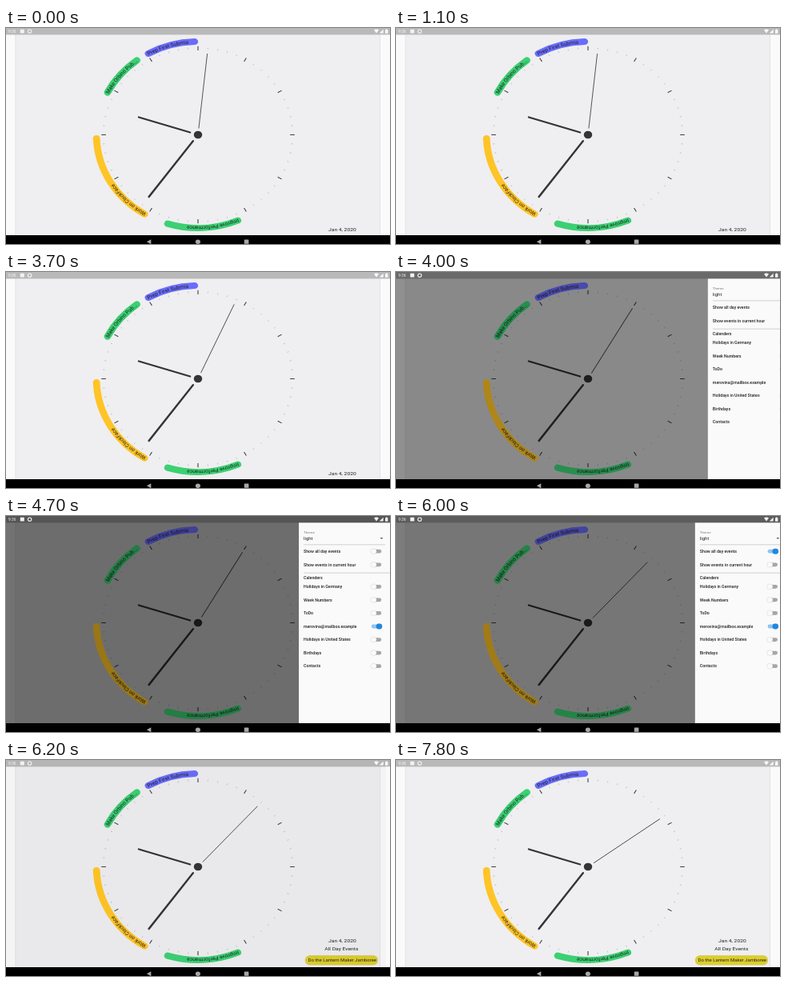
Animation, 480 px wide and 270 px high, one loop 8000 ms. Source, as an HTML page:

```html
<!DOCTYPE html>
<html lang="en">
<head>
<meta charset="utf-8">
<title>Calendar clock</title>
<style>
  html, body { margin: 0; width: 100%; height: 100%; overflow: hidden; background: #000; }
  svg { display: block; width: 480px; height: 270px; }
  text { font-family: Roboto, "Noto Sans", sans-serif; white-space: pre; }
</style>
</head>
<body>
<svg id="stage" viewBox="0 0 480 270"></svg>
<script>
const LOOP = 8000, STEP = 100;
// One screen dp in stage pixels; the screen is slightly wider than true.
const DX = 0.375, DY = 0.345;
const DRAWER_W = 114, SPRING = 0.0224;
const INK = '#333537';

const stage = document.getElementById('stage');

function add(parent, tag, attrs = {}, content) {
  const el = document.createElementNS('http://www.w3.org/2000/svg', tag);
  for (const key in attrs) el.setAttribute(key, attrs[key]);
  if (content !== undefined) el.textContent = content;
  parent.appendChild(el);
  return el;
}
const rect = (parent, x, y, width, height, fill, rx = 0) =>
  add(parent, 'rect', { x, y, width, height, fill, rx });
const path = (parent, d, attrs) => add(parent, 'path', { d, ...attrs });
const label = (parent, x, y, size, str, attrs = {}) =>
  add(parent, 'text', {
    transform: `translate(${x} ${y}) scale(${DX} ${DY})`,
    'font-size': size, fill: '#212121', ...attrs
  }, str);

// Clock angles run clockwise from twelve.
function polar(r, deg) {
  const a = deg * Math.PI / 180;
  return `${(r * Math.sin(a)).toFixed(2)} ${(-r * Math.cos(a)).toFixed(2)}`;
}
const arc = (r, from, to) => `M${polar(r, from)}A${r} ${r} 0 0 1 ${polar(r, to)}`;
const spoke = (r1, r2, deg) => `M${polar(r1, deg)}L${polar(r2, deg)}`;
const dial = parent => add(parent, 'g', { transform: 'translate(240 133.5) scale(1.09 1)' });

// Page
rect(stage, 0, 0, 480, 259, '#fafafa');
rect(stage, 11.5, 8, 456.5, 251, '#dedede');
rect(stage, 12.3, 8, 455, 251, '#efeef0');
rect(stage, 0, 0, 480, 8.4, '#b9b9b9');

// Dial and hands
const face = dial(stage);
let hours = '', minutes = '';
for (let i = 0; i < 60; i++) {
  if (i % 5) minutes += spoke(107.6, 109.4, i * 6);
  else hours += spoke(105.6, 110.8, i * 6);
}
path(face, minutes, { stroke: '#b4b4b4', 'stroke-width': 0.8 });
path(face, hours, { stroke: '#404040', 'stroke-width': 1 });
path(face, spoke(9.5, 71.5, 288), { stroke: INK, 'stroke-width': 2.1, 'stroke-linecap': 'round' });
path(face, spoke(9.5, 95.8, 216), { stroke: INK, 'stroke-width': 2.3, 'stroke-linecap': 'round' });
const second = path(face, spoke(8, 102, 0), { stroke: '#4a4a4a', 'stroke-width': 0.85 });
add(face, 'circle', { r: 4.8, fill: INK });

// Date and all-day events
const middle = { 'text-anchor': 'middle' };
const dateOnly = add(stage, 'g');
label(dateOnly, 420.4, 254.4, 18, 'Jan 4, 2020', middle);
const allDay = add(stage, 'g');
label(allDay, 420.4, 228.2, 18, 'Jan 4, 2020', middle);
label(allDay, 419.4, 237.6, 18, 'All Day Events', middle);
rect(allDay, 373.8, 244.2, 91.2, 12.2, '#cfc78a', 6);
rect(allDay, 374.2, 244.6, 90.4, 11.4, '#ddce2c', 5.7);
label(allDay, 377.5, 252.4, 16, 'Do the Lantern Maker Jamboree');

const scrim = rect(stage, 0, 0, 480, 259, '#000');

// Events around the dial
const events = [
  [-29.3, -1.9, '#6a6cfb', 'Prep First Submis'],
  [-63, -37, '#3bd073', 'Make Orbino Pub...'],
  [-148.3, -92.2, '#ffc425', 'Work on ClockFace'],
  [156.9, 197.4, '#3bd073', 'Improve Performance']
];
const ring = dial(stage);
events.forEach(([from, to, color, name], i) => {
  path(ring, arc(116.5, from, to),
    { fill: 'none', stroke: color, 'stroke-width': 8, 'stroke-linecap': 'round' });
  path(ring, arc(114.3, from - 0.5, to + 12), { id: 'line' + i, fill: 'none' });
  const text = add(ring, 'text', { 'font-size': 6.2, fill: '#1d1d1d' });
  add(text, 'textPath', { href: '#line' + i }, name);
});

// Drawer
const drawer = add(stage, 'g');
rect(drawer, 0, 8.4, DRAWER_W + 1, 250.6, '#fafafa');
label(drawer, 6, 21.6, 12, 'Theme', { fill: '#757575' });
label(drawer, 6, 29.6, 16, 'light');
path(drawer, 'M101.6 27.1h3.8l-1.9 1.8z', { fill: '#616161' });
rect(drawer, 6, 35.6, 102, 0.6, '#b5b5b5');
rect(drawer, 6, 70.8, 108, 0.6, '#b5b5b5');
label(drawer, 6, 78.9, 14, 'Calenders', { 'font-weight': 500 });

function toggle(y) {
  const track = rect(drawer, 90.8, y - 2.4, 12.4, 4.8, '', 2.4);
  const thumb = add(drawer, 'ellipse', {
    cy: y, rx: 3.7, ry: 3.4, stroke: '#000', 'stroke-opacity': 0.16, 'stroke-width': 0.5
  });
  return on => {
    track.setAttribute('fill', on ? '#8dc4f3' : '#a6a6a6');
    thumb.setAttribute('fill', on ? '#1e88e5' : '#fafafa');
    thumb.setAttribute('cx', on ? 100.5 : 93.5);
  };
}
function option(y, name, on = false) {
  label(drawer, 6, y + 1.7, 14, name, { 'font-weight': 500 });
  const set = toggle(y);
  set(on);
  return set;
}
const setAllDay = option(44.2, 'Show all day events');
option(60.8, 'Show events in current hour');
['Holidays in Germany', 'Week Numbers', 'ToDo', 'merovina@mailbox.example',
  'Holidays in United States', 'Birthdays', 'Contacts'
].forEach((name, i) => option(88.3 + i * 16.56, name, i === 3));

// System bars
const white = { fill: '#fff', 'fill-opacity': 0.92 };
label(stage, 3, 6.2, 13, '9:36', white);
rect(stage, 17.8, 1.8, 5, 4.8, '#f2f2f2', 0.6);
add(stage, 'circle', { cx: 29.6, cy: 4.2, r: 2.2, fill: 'none', stroke: '#f2f2f2', 'stroke-width': 1.1 });
path(stage, 'M460 2.4q3-1.6 6 0l-3 4.2z', white);
path(stage, 'M471.6 1.8v4.8h-4.8z', white);
path(stage, 'M474 2.3h1v-.7h1.4v.7h1v4.4H474z', white);
rect(stage, 0, 259, 480, 11, '#000');
path(stage, 'M181.3 264.2v6l-5.4-3z', { fill: '#a8a8a8' });
add(stage, 'ellipse', { cx: 239.9, cy: 267.2, rx: 3, ry: 2.8, fill: '#a8a8a8' });
rect(stage, 297.8, 264.6, 5.6, 5.2, '#a8a8a8', 0.4);

// Start time of each new second
const ticks = [0, 1500, 2700, 3100, 4000, 5400, 5800, 7700, 7800];
const ALL_DAY_AT = 5600;

// Critically damped spring: the share of the way still to go
function left(ms) {
  const u = ms * SPRING;
  return (1 + u) * Math.exp(-u);
}
function openness(t) {
  if (t < 4000) return 0;
  return t < 6000 ? 1 - left(t - 3869) : left(t - 5981);
}

function draw(t) {
  const open = openness(t);
  const on = t >= ALL_DAY_AT;
  const sec = ticks.filter(start => start <= t).length;
  second.setAttribute('transform', `rotate(${sec * 6})`);
  scrim.setAttribute('opacity', 0.54 * open);
  ring.style.filter = open > 0.005 ? `brightness(${1 - 0.4 * open})` : 'none';
  drawer.setAttribute('transform', `translate(${480 - DRAWER_W * open} 0)`);
  drawer.setAttribute('visibility', open > 0.005 ? 'visible' : 'hidden');
  dateOnly.setAttribute('visibility', on ? 'hidden' : 'visible');
  allDay.setAttribute('visibility', on ? 'visible' : 'hidden');
  setAllDay(on);
}

const begin = performance.now();
function frame() {
  const t = (performance.now() - begin) % LOOP;
  draw(Math.floor(t / STEP) * STEP);
  requestAnimationFrame(frame);
}
frame();
</script>
</body>
</html>
```
